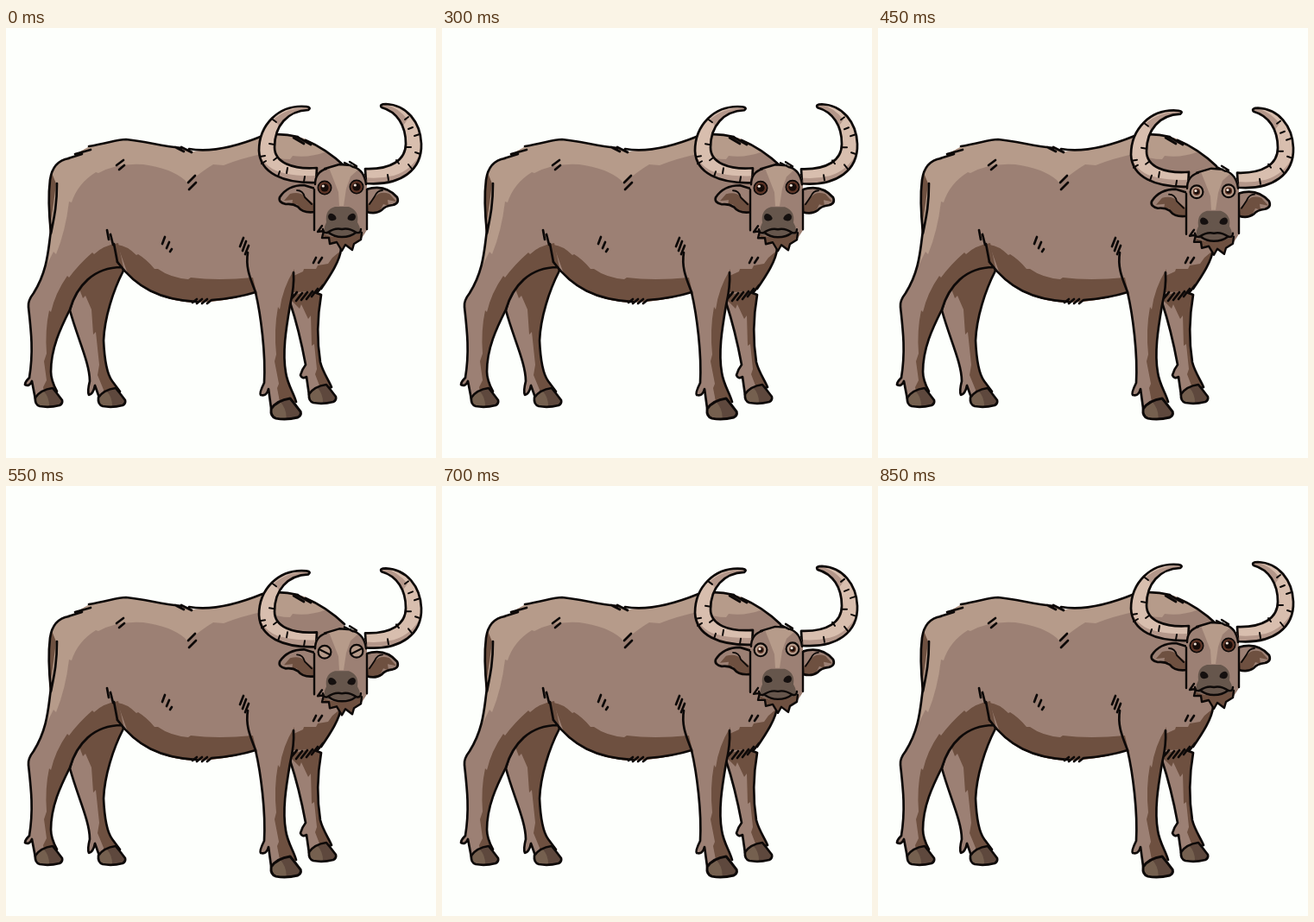
Recreate the animation shown at these times as an HTML page with a canvas. Size 498 by 498 pixels, loop 0.9 s.

```html
<!DOCTYPE html>
<html lang="en">
<head>
<meta charset="utf-8">
<title>Buffalo</title>
<style>
html, body { margin: 0; width: 100%; height: 100%; overflow: hidden; background: #fdfffc; }
canvas { display: block; }
</style>
</head>
<body>
<canvas id="stage" width="498" height="498"></canvas>
<script>
const ctx = document.getElementById('stage').getContext('2d');
const INK = '#0d0908', MID = '#9c8074', LIGHT = '#b69b8a', DARK = '#6e5040';
const HORN = '#d8beae', HORN_SHADE = '#b4978a', HOOF = '#75604f', NOSE = '#66564c';
const LOOP = 900, STEP = 50, DROP = 7.5;

function shape(d, fill, line, width = 2.7) {
  const path = new Path2D(d);
  if (fill) { ctx.fillStyle = fill; ctx.fill(path); }
  if (line) { ctx.strokeStyle = line; ctx.lineWidth = width; ctx.stroke(path); }
}

// Fills several shades inside one silhouette, then inks its edge.
function shaded(outline, base, shades, edge = INK) {
  shape(outline, base);
  ctx.save();
  ctx.clip(new Path2D(outline));
  for (const [d, color] of shades) shape(d, color);
  ctx.restore();
  if (edge) shape(outline, null, edge);
}

function hoof(x, y, scale = 1) {
  ctx.save();
  ctx.translate(x, y);
  ctx.scale(scale, scale);
  shaded('M1 11 Q7 2 21 0 Q26 6 32 14 Q33 18 29 20 Q17 23 6 21 Q0 19 1 11Z', HOOF, [
    ['M10 3 Q18 11 17 24 L36 22 L32 8 L21 -2Z', '#5e483d']
  ]);
  ctx.restore();
}

const farHind = 'M136 281 C124 304 114 336 113 362 C114 384 117 401 123 409 L132 421 L108 428 L103 414 ' +
  'Q101 424 96 425 Q94 421 97 409 C97 388 83 360 74 327 C80 298 100 270 130 262Z';
const farFront = 'M365 309 C361 332 360 362 364 387 C367 399 374 408 377 416 L351 425 L348 404 ' +
  'Q343 407 341 402 Q343 395 347 390 C342 363 337 342 329 318 L333 296Z';
const body = 'M51 181 C53 160 61 151 76 150 Q85 143 97 137 C116 134 129 129 139 129 ' +
  'C161 131 180 137 200 139 L217 143 C245 141 276 136 297 125 Q320 121 345 128 Q368 137 392 160 ' +
  'L388 254 C387 269 376 286 363 305 L333 306 L329 321 C324 350 320 376 324 399 ' +
  'C326 413 333 422 336 433 L307 440 L304 418 Q302 427 295 425 Q293 423 299 411 ' +
  'C301 377 295 332 289 306 Q267 314 237 317 L216 318 C179 315 151 301 134 277 ' +
  'C101 277 82 299 74 326 C63 348 52 371 52 398 Q52 408 59 421 L34 430 L30 409 ' +
  'Q27 416 22 413 Q22 410 27 405 C32 375 29 350 26 323 Q25 316 32 307 C49 280 49 254 52 235Z';

const bodyShades = [
  ['M45 145 L97 130 L139 124 L220 138 L300 118 L300 145 Q272 151 252 159 L240 158 Q228 165 210 180 L207 176 ' +
   'Q190 162 159 158 Q129 156 107 168 L104 167 Q83 180 76 202 L73 201 Q69 235 58 262 L55 259 L42 285 L45 240Z', LIGHT],
  ['M296 122 L345 124 L372 143 Q350 151 332 148 L329 152 Q315 152 302 146Z', LIGHT],
  ['M130 249 Q112 252 102 262 L100 260 Q84 274 73 289 L71 287 Q57 307 52 329 L50 327 ' +
   'Q45 350 47 377 L44 386 L47 408 L43 416 L46 432 L66 424 L78 326 L136 277Z', DARK],
  ['M129 251 Q140 252 151 263 L153 262 Q163 268 172 279 L176 279 Q190 289 211 291 L214 289 ' +
   'Q245 293 286 289 L291 310 L218 322 L150 310Z', DARK],
  ['M333 287 L344 282 L345 279 L359 279 L361 275 L373 273 L378 266 L390 256 L388 280 L362 310 L329 320Z', DARK],
  ['M334 279 Q320 302 317 326 L315 323 Q310 350 313 378 L311 386 L316 412 L314 417 L318 438 L340 433 L329 321Z', DARK]
];

function drawBody() {
  shaded(farHind, MID, [
    ['M74 291 L83 297 L89 313 L92 310 L99 326 Q100 340 101 355 L104 352 L108 390 L106 402 L113 419 L112 430 ' +
     'L134 424 L114 370 L142 275 L100 262Z', DARK]
  ]);
  shaded(farFront, MID, [
    ['M326 311 L340 325 L342 320 L350 337 L353 333 L354 368 L357 366 L360 395 L358 401 L366 422 ' +
     'L380 417 L365 380 L370 300Z', DARK]
  ]);
  shape('M58 160 Q50 169 50 187 L51 238 Q56 210 57 187Z', DARK);
  shaded(body, MID, bodyShades, null);
  shape('M53 168 Q49 180 50 238 Q55 205 58 180Z', DARK);

  shape('M52 238 C56 218 59 205 59 180 M52 236 Q48 200 51 176 Q54 154 73 151 M72 151 L88 146 ' +
    'M80 146 L98 141 M96 137 C116 134 129 129 139 129 C161 131 180 137 204 139 M196 138 L206 143 ' +
    'M203 138 L215 144 M212 140 C240 145 270 136 297 125 Q316 121 338 126 M333 127 L345 134 ' +
    'M337 126 L353 135 M347 130 Q371 140 392 160', null, INK);
  shape('M52 235 C49 254 49 280 32 307 Q25 316 26 323 C29 350 32 375 27 405 Q22 410 22 413 ' +
    'Q27 416 30 409 L34 430 M59 421 Q52 408 52 398 C52 371 63 348 74 326 C82 299 101 277 134 277 ' +
    'M129 271 C151 301 179 315 221 317 M216 318 L221 314 M221 319 L227 314 M227 319 L233 314 ' +
    'M233 319 L238 315 Q267 313 289 306', null, INK);
  shape('M280 260 C277 279 284 292 289 306 C295 332 301 377 299 411 Q293 423 295 425 Q302 427 304 418 ' +
    'L307 440 M336 433 C333 422 326 413 324 399 C320 376 324 350 329 321 Q334 300 333 283 ' +
    'M388 256 C387 269 376 286 365 302 M331 313 L337 306 M336 316 L343 307 M342 315 L349 306 ' +
    'M348 314 L355 305 M354 311 L361 302 M360 307 L367 298 M356 272 L359 266 M362 272 L366 266', null, INK);
  shape('M128 159 L136 153 M131 164 L137 159 M211 179 L219 171 M212 187 L220 179 ' +
    'M181 250 L184 242 M186 255 L189 248 M190 259 L192 256 M117 234 L119 245 M121 239 L124 251 ' +
    'M125 250 L129 271 M271 253 L275 243 M274 258 L278 247 M277 262 L281 252', null, INK);

  hoof(33, 417);
  hoof(106, 417);
  hoof(306, 429, 1.1);
  hoof(350, 413);
}

const leftHorn = 'M360 162 C332 164 311 156 311 138 C311 113 326 96 350 95 Q354 92 348 91 ' +
  'C315 88 293 113 293 142 C294 168 321 180 359 179Z';
const rightHorn = 'M416 163 C446 164 463 153 463 134 C463 113 453 97 435 92 Q432 88 440 88 ' +
  'C464 89 480 109 481 134 C482 164 458 183 417 180Z';
const leftEar = 'M358 186 L345 182 Q326 182 317 196 Q315 202 324 204 Q332 203 338 207 Q344 215 358 213Z';
const rightEar = 'M417 187 Q439 180 453 196 Q456 203 448 205 Q439 206 435 211 Q428 216 418 213Z';
const face = 'M357 178 Q358 165 374 161 L386 158 L398 158 Q414 162 418 178 L418 234 L411 245 ' +
  'L403 250 L401 257 L393 251 L389 258 L383 249 L375 250 L374 243 L367 243 L366 236 L357 235Z';

function disc(x, y, radius, fill, line) {
  ctx.beginPath();
  ctx.arc(x, y, radius, 0, Math.PI * 2);
  if (fill) { ctx.fillStyle = fill; ctx.fill(); }
  if (line) { ctx.strokeStyle = INK; ctx.lineWidth = line; ctx.stroke(); }
}

function drawEye(x, y, slope, closed) {
  ctx.save();
  ctx.translate(x, y);
  disc(0, 0, 7.4, LIGHT, 2.2);
  if (closed > 0.95) {
    shape(`M-6 ${-6 * slope} L6 ${6 * slope}`, null, INK, 2.2);
  } else {
    const open = 1 - closed * closed;
    disc(0, 0, 6.8 * open, '#5d3426');
    disc(0, 0, 4.6 * open, '#160c09');
    disc(-1.7 * open, -2 * open, 1.6, '#f4e5da');
  }
  ctx.restore();
}

function drawHead(closed) {
  ctx.save();
  ctx.translate(0, DROP * closed);

  shaded(leftHorn, HORN, [
    ['M290 137 Q298 164 322 168 Q339 172 362 171 L361 183 L320 181 L288 164Z', HORN_SHADE],
    ['M310 106 Q326 91 354 92 L350 97 Q326 96 316 113Z', HORN_SHADE]
  ]);
  shaded(rightHorn, HORN, [
    ['M484 137 Q473 164 449 171 Q432 175 414 173 L416 184 L457 183 L484 162Z', HORN_SHADE],
    ['M465 106 Q453 90 432 87 L435 94 Q451 99 460 113Z', HORN_SHADE]
  ]);
  shape('M309 106 L313 109 M305 134 L311 135 M294 149 L300 148 M296 157 L301 154 M310 153 L314 150 ' +
    'M315 172 L317 166 M325 168 L326 162 M345 178 L346 172 M466 103 L462 106 M471 115 L466 117 ' +
    'M479 123 L473 125 M463 138 L469 138 M480 146 L474 144 M470 163 L466 158 M455 157 L452 153 ' +
    'M443 176 L442 170', null, INK, 2);

  shaded(leftEar, MID, [
    ['M329 192 Q340 189 346 195 L358 205 L357 215 L341 212 L337 204 L331 205 L332 199 L322 200Z', DARK]
  ]);
  shaded(rightEar, MID, [
    ['M444 192 Q433 188 427 196 L417 206 L418 215 L433 212 L437 204 L443 206 L442 199 L452 201Z', DARK]
  ]);
  shape('M337 188 Q344 188 346 196 L354 204 M436 188 Q430 188 427 195 L421 204', null, INK, 1.8);

  shaded(face, MID, [
    ['M374 162 L386 157 L403 158 L409 163 L399 172 L394 186 L391 206 L386 206 L385 190 L378 172Z', LIGHT],
    ['M367 238 Q389 248 411 236 L412 249 L400 262 L375 257Z', DARK]
  ], null);
  shape('M357 187 L357 234 M418 187 L418 233 M358 181 Q358 167 371 163 ' +
    'M369 163 L386 158 L399 159 M392 156 L402 161 M398 155 L406 160 M403 161 Q415 165 417 181 ' +
    'M366 229 L361 236 L368 235 L366 243 L374 243 L375 250 L383 248 L389 258 L393 251 L401 257 ' +
    'L403 250 L411 245 L412 237', null, INK, 2.4);

  shape('M371 225 Q369 210 381 207 L397 207 Q409 211 407 225 Q413 235 407 239 ' +
    'Q389 246 371 239 Q366 235 371 225Z', NOSE);
  shape('M373 218 Q375 212 381 217 Q385 222 379 223 Q373 224 373 218Z ' +
    'M405 218 Q403 212 397 217 Q393 222 399 223 Q405 224 405 218Z', '#15100f');
  shape('M367 233 Q367 238 372 237 Q381 231 389 233 Q397 231 406 237 Q411 238 411 233 ' +
    'M374 237 Q380 242 389 242 Q399 242 405 237', null, INK, 2.4);

  drawEye(369, 185, 0.5, closed);
  drawEye(406, 184, -0.5, closed);
  ctx.restore();
}

function ease(t, start, end) {
  const u = Math.min(1, Math.max(0, (t - start) / (end - start)));
  return u * u * (3 - 2 * u);
}

function draw(now) {
  const t = Math.floor((now % LOOP) / STEP) * STEP;
  const closed = t <= 600 ? ease(t, 265, 580) : 1 - ease(t, 600, 850);
  ctx.fillStyle = '#fdfffc';
  ctx.fillRect(0, 0, 498, 498);
  drawBody();
  drawHead(closed);
}

ctx.lineCap = ctx.lineJoin = 'round';
const start = performance.now();
function tick() {
  draw(performance.now() - start);
  requestAnimationFrame(tick);
}
tick();
</script>
</body>
</html>
```
